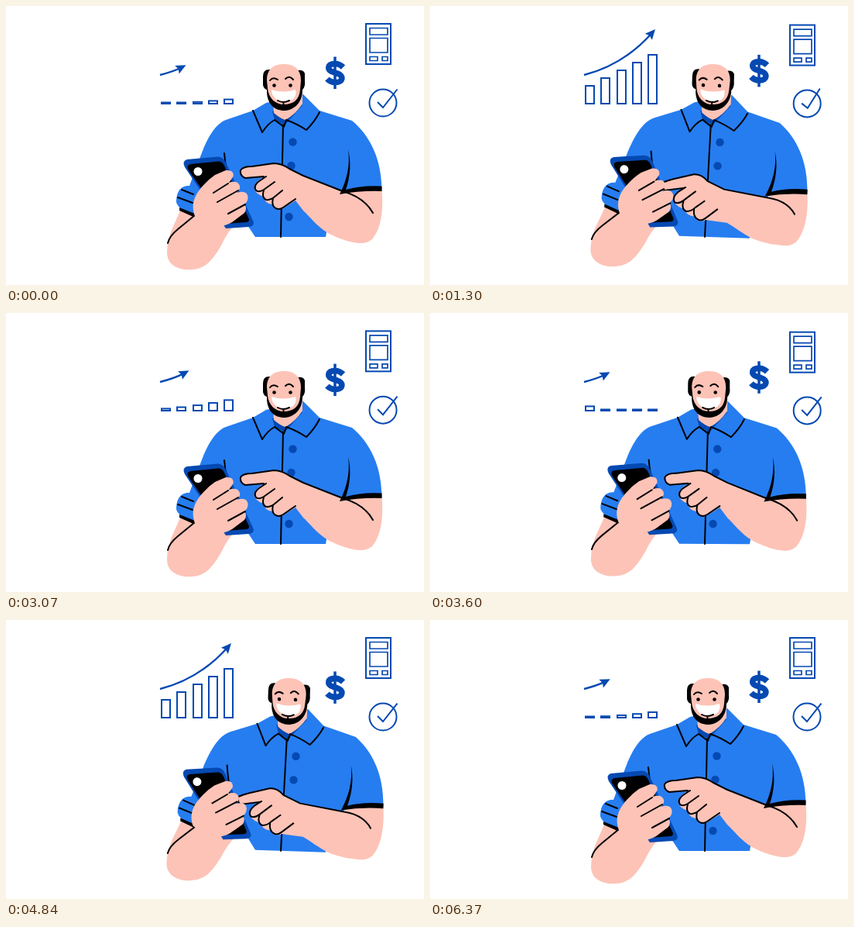
An HTML page for the animation above (6400 ms loop, 540 by 360 pixels).

```html
<!DOCTYPE html>
<html lang="en">
<head>
<meta charset="utf-8">
<title>Man using a phone</title>
<style>
html, body { margin: 0; width: 100%; height: 100%; overflow: hidden; background: #fff; }
svg { display: block; width: 100vw; height: 100vh; }
.shirt { fill: #267df0; }
.navy { fill: #0549b2; }
.skin { fill: #fdc3b7; }
.line { fill: none; stroke: #000; stroke-width: 2; stroke-linecap: round; stroke-linejoin: round; }
.icon { fill: none; stroke: #0549b2; stroke-width: 2; }
</style>
</head>
<body>
<svg viewBox="0 0 540 360">
  <g id="chart" class="icon">
    <path id="curve" stroke-width="2.400"/>
    <path id="arrowhead" class="navy" stroke="none" d="M0 0L-13 -6L-11 0L-13 6Z"/>
  </g>

  <g id="page" class="icon">
    <rect x="465" y="23" width="32" height="52"/>
    <path d="M470 28.500h23v8.500h-23zM470 41.500h23v18.500h-23zM470 65.500h10v5h-10zM486 65.500h7v5h-7z" stroke-width="1.700"/>
  </g>
  <g id="dollar" class="icon">
    <path stroke-width="7.600" d="M435.500 79Q431 74.500 425 74.500C414.500 74.500 414.500 83 422 85L428 87C436.500 89.500 436 98.500 425.500 98.500Q419 98.500 415 94"/>
    <path stroke-width="3.500" d="M425 65.500V107"/>
  </g>
  <g id="check" class="icon">
    <circle cx="487" cy="125" r="17.500"/>
    <path id="tick" d="M480 124L487 131L505.500 107.500"/>
  </g>

  <g id="body">
    <path class="shirt" d="M319 135L284 147C268 153 257 177 249 200L237 232C225 231 220 241 220 253Q222 263 246 271L300 265L322 298H413L418 270L437 241L485.500 237C485 198 471 168 447 148L405 135L384 114L336 125Z"/>
    <path class="line" d="M282 190Q283 202 285 212M358 152L355 298" />
    <g class="navy">
      <circle cx="370.500" cy="175.500" r="5.200"/><circle cx="368.500" cy="206" r="5.200"/><circle cx="365.500" cy="272" r="5.200"/>
      <path d="M344 136L347 147L360 154L383 128L376 126Z"/>
    </g>
    <path class="skin" d="M345 125L346 138Q354 145 361 147Q374 140 383 126V112Z"/>
    <path class="line" d="M319 135L331 163Q338 152 347 147L359 156L362 147Q376 152 388 160Q399 149 405 137"/>

    <path d="M341 82Q332 81 332 91V102Q333 107 337 108V112C338 126 346 135 360 135C374 134 383 123 383 108Q387 104 386 96V87Q384 82 377 83Z"/>
    <path class="skin" d="M337 96C337 81 346 75 359 75C373 75 381 82 381 96L380 108C379 121 371 127 359 127C348 127 339 119 338 106Z"/>
    <path fill="#fff" d="M343 108Q358 113 374 108Q376 116 370 121Q361 125 350 121Q343 116 343 108Z"/>
    <path class="line" stroke-width="1.600" d="M341 96Q345 91 351 95M361 94Q366 89 371 95M351 122Q358 126 366 122M358.500 124V129"/>
    <circle cx="346.500" cy="102.500" r="2.300"/><circle cx="367.500" cy="102.500" r="2.300"/>

    <path class="line" d="M227 237L242 243M222 247L241 254"/>
    <path class="skin" d="M225 264L246 269L298 279Q288 290 282 301Q273 320 262 331Q250 342 230 340Q208 336 208 318Q208 300 218 280Z"/>
    <path d="M224 260L244 268L242 272L224 264Z"/>
    <path class="line" d="M209 306Q211 297 222 288L244 270"/>

    <g id="phone">
      <path class="navy" d="M234 198L273 194.500Q280 194 284 202L319 277Q322 284 314 285L284 287L231 208Q227 200 234 198Z"/>
      <path d="M239 204L274 200.500Q279 200 282 206L313 273Q316 278 310 279L284 281L236 212Q232 205 239 204Z"/>
      <circle cx="248" cy="213.500" r="5.500" fill="#fff"/>
    </g>

    <path class="skin" d="M436 240L485.500 237C488 265 484 288 473 301C464 309 450 306 437 302Z"/>
    <path id="arm" class="skin"/>
    <path id="armLines" class="line"/>
    <path d="M442 185Q446 214 431 243Q458 238 485.500 239V232.500Q460 231 439 237Q448 210 442 185Z"/>

    <g id="grip">
      <path class="skin" d="M244 271C240 261 241 250 248 240Q258 226 270 218L284 212Q295 211 293.500 220L288 228Q299 224 302 232Q303 237 298 241Q311 237 312.500 246Q313 252 308 256Q312 261 308 267L292 279Q270 292 244 271Z"/>
      <path class="line" d="M268 241L287 229M273 253L300 238M287 268L309 256"/>
    </g>
  </g>
</svg>
<script>
const CYCLE = 3200;
const START = [199, 89], BEND = [250, 76], END = [291, 30];

// The pointing arm, raised and pressing; both poses share one path structure.
const ARM = {
  up: 'M452 247L473 268L469 303C456 308 434 303 416 293C401 284 393 272 384 264L374 251L358 261Q347 265 344 256Q334 255 333 246Q320 242 321 232Q324 225 333 221L309 222Q302 219 303 212Q306 207 318 207L346 203Q356 203 366 210L384 219L437 241Z',
  down: 'M452 249L471 266L469 303C456 308 434 305 416 298C403 292 393 284 383 279L364 277L356 276Q345 281 341 272Q331 272 327 263Q313 259 313 249Q315 242 325 236L301 240Q296 236 298 230Q304 227 311 225L338 218Q348 217 356 226L378 236L437 246Z'
};
const ARM_LINES = {
  up: 'M333 220L309 222Q302 219 303 212Q306 207 318 207L346 203Q356 203 366 210L384 219L435 239Q463 247 474 267M336 220L327 226Q319 232 323 238Q327 241 333 237L347 227M333 238Q330 247 336 250Q341 251 346 247L357 238M345 248Q343 257 347 260Q352 264 358 260L374 249',
  down: 'M325 236L301 240Q296 236 298 230Q304 227 311 225L338 218Q348 217 356 226L378 236L435 245Q460 248 470 265M328 235L319 241Q310 249 315 255Q320 257 326 252L341 240M326 253Q323 263 330 266Q336 266 341 261L353 252M340 263Q339 272 344 275Q349 279 355 274L370 262'
};

const el = id => document.getElementById(id);
const mix = (a, b, t) => a + (b - a) * t;
const mixPoint = (p, q, t) => [mix(p[0], q[0], t), mix(p[1], q[1], t)];

function mixPath({ up, down }, t) {
  const targets = down.match(/\d+/g);
  let i = 0;
  return up.replace(/\d+/g, n => mix(+n, +targets[i++], t).toFixed(2));
}

// Sine ease from 0 to 1 between two times.
function ease(t, from, to) {
  const p = Math.min(1, Math.max(0, (t - from) / (to - from)));
  return (1 - Math.cos(p * Math.PI)) / 2;
}
const shift = (id, x, y) => el(id).setAttribute('transform', `translate(${x} ${y})`);

const bars = Array.from({ length: 5 }, (_, i) => {
  const bar = document.createElementNS('http://www.w3.org/2000/svg', 'rect');
  bar.setAttribute('x', Math.round(201 + i * 20.25));
  bar.setAttribute('width', 11);
  el('chart').append(bar);
  return bar;
});

function drawBars(t) {
  bars.forEach((bar, i) => {
    const grow = 273 + i * 120, shrink = 2210 + i * 25;
    // The end of the shrink runs on into the next cycle.
    const amount = t < 273
      ? 1 - ease(t + CYCLE, shrink, shrink + 1100)
      : ease(t, grow, grow + 390) - ease(t, shrink, shrink + 1100);
    const height = Math.max(1.5, (23 + i * 10) * amount);
    bar.setAttribute('height', height);
    bar.setAttribute('y', 126 - height);
  });
}

function drawArrow(t) {
  const part = mix(.34, 1, ease(t, 400, 1170) - ease(t, 2400, 3200));
  const bend = mixPoint(START, BEND, part);
  const tip = mixPoint(bend, mixPoint(BEND, END, part), part);
  const angle = Math.atan2(tip[1] - bend[1], tip[0] - bend[0]);
  const neck = [tip[0] - 7 * Math.cos(angle), tip[1] - 7 * Math.sin(angle)];
  el('curve').setAttribute('d', `M${START}Q${bend} ${neck}`);
  el('arrowhead').setAttribute('transform', `translate(${tip}) rotate(${angle * 180 / Math.PI})`);
}

function draw(time) {
  const t = time % CYCLE;
  drawBars(t);
  drawArrow(t);

  const beat = t % 1600;
  const bob = ease(beat, 0, 900) - ease(beat, 900, 1600);
  const nudge = ease(t, 1080, 1280) - ease(t, 1340, 1560);
  shift('page', 0, bob * 4);
  shift('check', .5 * bob, bob * 2.3);
  el('tick').setAttribute('transform', `rotate(${-6 * nudge} 487 125)`);
  shift('dollar', 0, -7 * ease(t, 0, 850) + 8 * ease(t, 850, 1700) - ease(t, 2330, 3200));

  const lean = ease(t, 230, 830) - ease(t, 2270, 2870);
  el('body').setAttribute('transform', `rotate(${1.9 * lean} 360 298)`);
  const press = ease(t, 640, 1280) - ease(t, 2380, 2900);
  el('arm').setAttribute('d', mixPath(ARM, press));
  el('armLines').setAttribute('d', mixPath(ARM_LINES, press));
  const slide = lean * (1 - nudge);
  shift('phone', -4 * slide, nudge - slide);
  shift('grip', -3.5 * slide, -1.5 * slide);
}

const begin = performance.now();
function tick() {
  draw(performance.now() - begin);
  requestAnimationFrame(tick);
}
tick();
</script>
</body>
</html>
```
